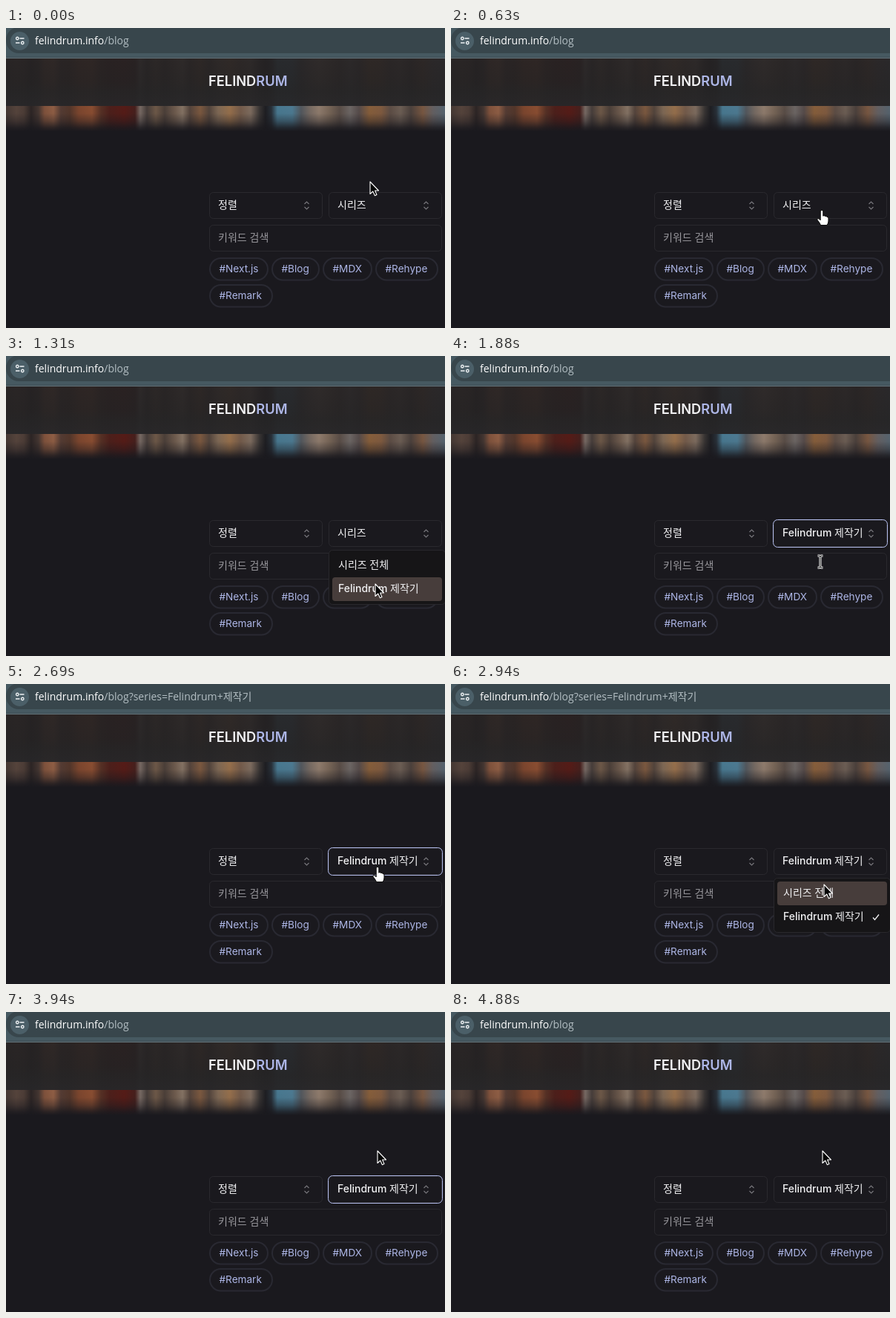
An HTML page with a canvas for the animation above (4940 ms loop, 592 px wide and 404 px high).

```html
<!DOCTYPE html>
<html lang="ko">
<head>
<meta charset="utf-8">
<style>
html, body { margin: 0; width: 100%; height: 100%; overflow: hidden; background: #1a191e; }
canvas { display: block; }
</style>
</head>
<body>
<canvas id="stage" width="592" height="404"></canvas>
<script>
const ctx = document.getElementById('stage').getContext('2d');
const LOOP = 4940, STEP = 62.5;
const UI = 'Inter, "Noto Sans CJK KR", sans-serif';
const LABEL_FONT = '500 14px ' + UI;
const URL_FONT = '14px "Open Sans", "Noto Sans CJK KR", sans-serif';
const NAME = 'Felindrum', SERIES = NAME + ' 제작기';
const LILAC = '#adb6e6', WHITE = '#f1f1f3';

// Blurred bookshelf: colours along x
const SHELF = `0 #4a3c36,14 #5e4a40,24 #54423a,34 #2e2625,44 #4a3a34,52 #8e5a40,64 #a0684a,74 #5c4036,
86 #5a3a2c,98 #8a4c30,116 #9a5534,128 #5e3426,140 #54201a,160 #5e1c16,174 #4c201c,181 #85766e,190 #4c423e,
202 #7a624e,214 #52443c,228 #7a6454,238 #94806e,248 #5c4a40,262 #8a6244,274 #5a4a40,286 #8c735c,
302 #a87c52,316 #806450,330 #8c7868,342 #3c3836,350 #1e1e22,358 #2a333c,366 #4f86a0,386 #5488a2,
398 #5a6066,410 #84766c,422 #a08a78,436 #84705f,450 #62544c,464 #78716e,476 #5e5250,
490 #96683f,506 #8e6444,518 #66544a,532 #78685c,546 #524640,562 #866046,576 #6e6a6c,592 #5e6e7a`
  .split(',').map(s => s.trim().split(' '));

// Pointer path: time, x, y
const PATH = [
  [0, 491, 207], [300, 497, 232], [560, 500, 243], [800, 499, 250], [875, 499, 254],
  [1180, 498, 305], [1500, 498, 314], [1700, 498, 303], [1875, 498, 277], [2200, 500, 252],
  [2450, 501, 246], [2750, 501, 246], [2937, 503, 270], [3250, 502, 280], [3560, 501, 275],
  [3850, 501, 187], [LOOP, 501, 187]
];

const ARROW = new Path2D('M0 0V16.5L3.8 13L6.4 18.8L9 17.6L6.6 12H11.5Z');
const HAND = new Path2D('M-1.8 1.5Q0-1 1.8 1.5V8Q3.6 6.5 4.6 8.6Q6.4 7.6 7.2 9.6Q9 9 9 11.5V15Q9 18 7 20.5H-1.5Q-3 17-6 13.5Q-6.5 10.5-3.5 12L-1.8 13.5Z');
const BEAM = new Path2D('M-3.5-8H-1L0-7L1-8H3.5M0-7V7M-3.5 8H-1L0 7L1 8H3.5');

function text(str, x, y, color = WHITE, font = LABEL_FONT) {
  ctx.font = font;
  ctx.fillStyle = color;
  ctx.fillText(str, x, y);
  return x + ctx.measureText(str).width;
}

function box(x, y, w, h, r, fill, stroke, width = 1) {
  ctx.beginPath();
  ctx.roundRect(x, y, w, h, r);
  if (fill) { ctx.fillStyle = fill; ctx.fill(); }
  if (stroke) line(null, stroke, width);
}

function line(path, color, width = 1) {
  ctx.strokeStyle = color;
  ctx.lineWidth = width;
  path ? ctx.stroke(path) : ctx.stroke();
}

function fillRect(x, y, w, h, fill) {
  ctx.fillStyle = fill;
  ctx.fillRect(x, y, w, h);
}

function gradient(x0, y0, x1, y1, stops) {
  const g = ctx.createLinearGradient(x0, y0, x1, y1);
  stops.forEach(([at, color]) => g.addColorStop(at, color));
  return g;
}

function drawToolbar(filtered) {
  fillRect(0, 0, 592, 40, '#465961');
  box(0, -1, 620, 35, 17, '#38464c');
  fillRect(0, 39, 592, 1, '#3c4b52');
  fillRect(0, 40, 592, 1, '#66777e');
  box(6, 5, 25, 25, 12.5, '#4b5f68');
  line(new Path2D('M18.5 14H24.5M13 20H18.5M17 14A1.7 1.7 0 1 1 13.6 14A1.7 1.7 0 1 1 17 14M24 20A1.7 1.7 0 1 1 20.6 20A1.7 1.7 0 1 1 24 20'), '#eef2f4', 1.4);
  const end = text(NAME.toLowerCase() + '.info', 39, 22, '#fff', URL_FONT);
  text('/blog' + (filtered ? `?series=${NAME}+제작기` : ''), end, 22, '#b3bec3', URL_FONT);
}

function drawHeader() {
  fillRect(0, 41, 592, 98, gradient(0, 0, 592, 0, SHELF.map(([x, c]) => [x / 592, c])));
  fillRect(0, 105, 592, 34, gradient(0, 105, 0, 139, [[0, '#1a191e20'], [.3, '#1a191e28'], [.6, '#1a191e78'], [.85, '#1a191ed8'], [1, '#1a191e']]));
  fillRect(0, 41, 592, 64, gradient(0, 41, 0, 105, [[0, '#252223ea'], [.5, '#242223f0'], [.7, '#252425f8'], [1, '#272628f8']]));
  const font = '600 18.3px ' + UI;
  const end = text(NAME.slice(0, 6).toUpperCase(), 273, 78, WHITE, font);
  text(NAME.slice(6).toUpperCase(), end, 78, LILAC, font);
}

function drawSelect(x, label, focused) {
  box(x + .5, 221.5, 152, 35, 5, null, '#2a292e');
  if (focused) box(x - .5, 220.5, 154, 37, 6, null, '#b5beee');
  text(label, x + 12, 243);
  const cx = x + 131.5;
  line(new Path2D(`M${cx - 3} 237L${cx} 234L${cx + 3} 237M${cx - 3} 241L${cx} 244L${cx + 3} 241`), '#77767b', 1.2);
}

function drawTag(label, x, y, w) {
  box(x + 1, y + 1, w - 2, 29.5, 15, null, '#292932', 2);
  text(label, x + 13.5, y + 20, LILAC, '13.6px ' + UI);
}

function drawMenu(active, checked) {
  box(435.5, 261.5, 157, 73, 5, '#161517', '#29282c');
  box(440, 266 + active * 32, 148, 32, 4, '#473d3b');
  text('시리즈 전체', 448, 286);
  text(SERIES, 448, 318);
  if (checked) line(new Path2D('M569 314.5L571.5 317.5L577 310.5'), WHITE, 1.3);
}

function drawPointer(t, open) {
  const i = PATH.findIndex(p => p[0] > t);
  const [t0, x0, y0] = PATH[i - 1], [t1, x1, y1] = PATH[i];
  const k = (t - t0) / (t1 - t0);
  const x = x0 + (x1 - x0) * k, y = y0 + (y1 - y0) * k;
  ctx.save();
  ctx.translate(Math.round(x), Math.round(y));
  ctx.lineJoin = 'round';
  if (!open && y > 264 && y < 301) {
    line(BEAM, '#fff', 3);
    line(BEAM, '#111', 1);
  } else {
    const hand = !open && y > 220 && y < 258;
    const shape = hand ? HAND : ARROW;
    ctx.fillStyle = hand ? '#fff' : '#050505';
    ctx.fill(shape);
    line(shape, hand ? '#111' : '#fff', 1.1);
  }
  ctx.restore();
}

function draw(now) {
  const t = Math.floor(now % LOOP / STEP) * STEP;
  const within = (a, b) => t >= a && t < b;
  const firstOpen = within(687, 1500), secondOpen = within(2800, 3560);
  const chosen = t >= 1500;

  fillRect(0, 0, 592, 404, '#1a191e');
  drawHeader();
  drawToolbar(within(2060, 3680));
  drawSelect(274, '정렬');
  drawSelect(435, chosen ? SERIES : '시리즈', within(1500, 2800) || within(3560, 4740));
  box(274.5, 265.5, 313, 35, 5, null, '#2a292e');
  text('키워드 검색', 286, 287, '#98979c', '14px ' + UI);
  drawTag('#Next.js', 274, 309, 80);
  drawTag('#Blog', 358, 309, 65);
  drawTag('#MDX', 427, 309, 67);
  drawTag('#Rehype', 498, 309, 85);
  drawTag('#Remark', 274, 345, 86);
  if (firstOpen) drawMenu(t < 1130 ? 0 : 1, false);
  if (secondOpen) drawMenu(t < 2900 ? 1 : 0, true);
  drawPointer(t, firstOpen || secondOpen);
}

function tick() {
  draw(performance.now());
  requestAnimationFrame(tick);
}
tick();
</script>
</body>
</html>
```
